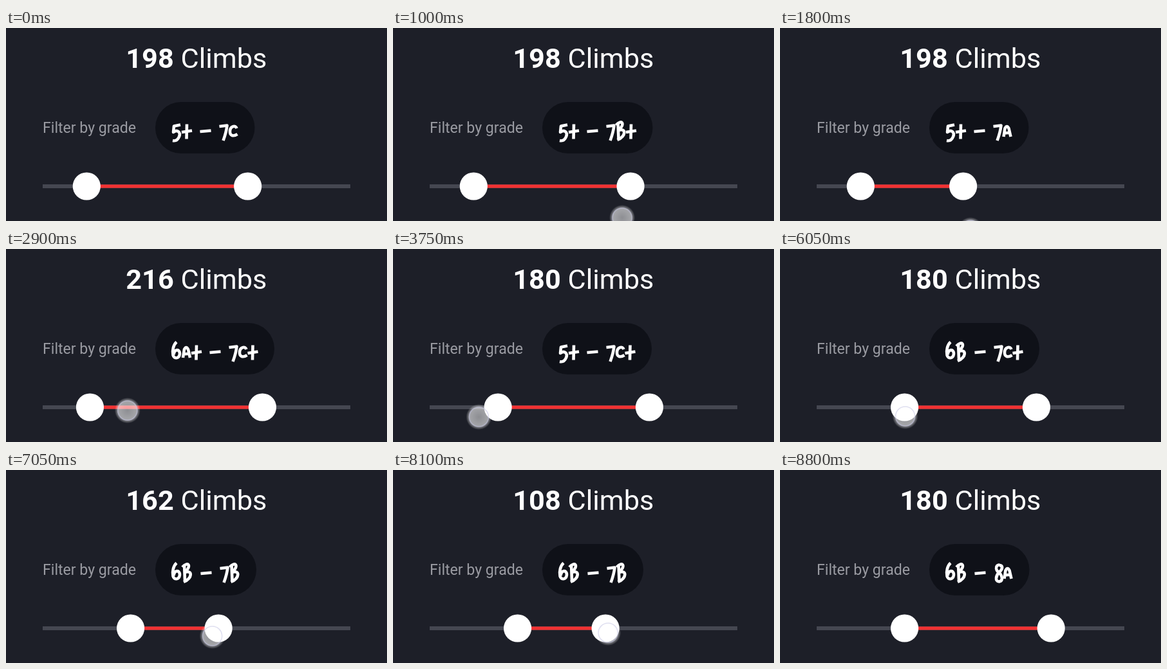
Recreate the animation shown at these times as an HTML page. Size 592 by 300 pixels, loop 8.85 s.

```html
<!DOCTYPE html>
<html lang="en">
<head>
<meta charset="utf-8">
<title>Grade filter</title>
<style>
html, body { margin: 0; width: 100%; height: 100%; overflow: hidden; background: #1d1f28; }
svg { display: block; width: 592px; height: 300px; font-family: Roboto, sans-serif; }
#label path { fill: none; stroke: #fff; stroke-width: 4.6; stroke-linejoin: round; }
</style>
</head>
<body>
<svg viewBox="0 0 592 300">
  <defs>
    <radialGradient id="glow">
      <stop offset="0" stop-color="#fff" stop-opacity=".5"/>
      <stop offset=".7" stop-color="#fff" stop-opacity=".6"/>
      <stop offset="1" stop-color="#fff" stop-opacity="0"/>
    </radialGradient>
  </defs>
  <rect width="592" height="300" fill="#1d1f28"/>
  <text x="295.8" y="61.7" font-size="43.3" fill="#fff" text-anchor="middle"><tspan id="count" font-weight="700">198</tspan> Climbs</text>
  <text x="57" y="163.3" font-size="23.1" fill="#9a9ba2">Filter by grade</text>
  <rect id="pill" x="232" y="115" height="80" rx="40" fill="#0f1118"/>
  <g id="label"></g>
  <rect x="57" y="243" width="478" height="6" fill="#454751"/>
  <rect id="range" y="243.4" height="5.2" fill="#f23132"/>
  <circle id="low" cy="246" r="21.6" fill="#fff"/>
  <circle id="high" cy="246" r="21.6" fill="#fff"/>
  <g id="finger">
    <circle r="20" fill="url(#glow)"/>
    <circle r="15" fill="none" stroke="#cacae6" stroke-opacity=".6" stroke-width="1.5"/>
  </g>
</svg>
<script>
const LOOP = 8850, LAG = 100, LEFT = 57, STEP = 478 / 21;
const FIRST = 3, PER_GRADE = 18;
const $ = id => document.getElementById(id);

// Grades by slider stop, from stop FIRST on
const GRADES = ['5+', '6A', '6A+', '6B', '6B+', '6C', '6C+', '7A', '7A+', '7B', '7B+', '7C', '7C+', '8A'];

// Brush glyphs: advance and strokes
const GLYPHS = {
  '5': [16, 'M14 150.5L4 152.5L3 162C9 157 15 162 12 169C10 174 7 176 2 175'],
  '6': [16, 'M8 144.5C3 149 1 158 2.5 165C4 171 12 171 13 163C13 155 5 155 3.5 164'],
  '7': [14, 'M0 153L12 151.5C11 160 9 167 6 175'],
  '8': [14, 'M12 150C6 143 0 152 6 158C13 163 15 172 8 173.5C1 173 3 164 8 159C14 154 14 148 9 148'],
  'A': [15, 'M2 169L4 156Q7 150 10 156L13 169M3 163.5L12 162.5'],
  'B': [16.5, 'M4 147L5 172M1 151C10 141 16 149 5 159C17 155 17 168 3 174'],
  'C': [15, 'M13 156C11 150 3 153 2.5 160C2 168 8 169 14 165'],
  '+': [15.5, 'M8 149.5L7.5 172.5M0 162L16 159.5'],
  '-': [43, 'M13 161L30 159.5']
};

// Drags of each handle: start, end, stop reached
const moves = {
  low: [[2770, 2895, 5], [3600, 3780, 3], [4600, 4700, 4], [4950, 5100, 5], [5820, 5940, 6]],
  high: [[800, 1350, 10], [1750, 2250, 15], [6700, 6930, 12], [8100, 8350, 16]]
};
const rest = { low: 3, high: 14 };

const touches = [
  { handle: 'high', from: 650, to: 2400, dx: 8, y: 256, dip: 66 },
  { handle: 'low', from: 2650, to: 3200, dx: 18, y: 251 },
  { handle: 'low', from: 3550, to: 3900, dx: 5, y: 261 },
  { handle: 'low', from: 4600, to: 5500, dx: 3, y: 262 },
  { handle: 'low', from: 5550, to: 6350, dx: 1, y: 260 },
  { handle: 'high', from: 6600, to: 7300, dx: -9.5, y: 258 },
  { handle: 'high', from: 8000, to: 8500, dx: 4, y: 253 }
];

// Times at which the climb count catches up with the range
const refreshes = [0, 2650, 3550, 4300, 5750, 6650, 7500, 8800];

const clamp = v => Math.max(0, Math.min(1, v));
const ease = v => { v = clamp(v); return v * v * (3 - 2 * v); };
const stopX = stop => LEFT + STEP * stop;

const value = (handle, t) => moves[handle].reduce(
  (v, [from, to, stop]) => v + (stop - v) * ease((t - from) / (to - from)), rest[handle]);
const nearest = (handle, t) => Math.round(value(handle, t));
const grade = (handle, t) => GRADES[nearest(handle, t) - FIRST];

// The handle trails the finger and lingers at each stop
function handleX(handle, t) {
  const v = value(handle, t - LAG), stop = Math.floor(v);
  return stopX(stop + ease(v - stop));
}

function climbs(t) {
  const at = refreshes.filter(r => r <= t).pop();
  return PER_GRADE * (nearest('high', at) - nearest('low', at));
}

function set(id, attrs) {
  for (const name in attrs) $(id).setAttribute(name, attrs[name]);
}

let shown = '';
function drawLabel(text) {
  if (text === shown) return;
  shown = text;
  let x = 257, html = '';
  for (const ch of text) {
    const [advance, d] = GLYPHS[ch];
    html += `<path transform="translate(${x} 0)" d="${d}"/>`;
    x += advance;
  }
  $('label').innerHTML = html;
  set('pill', { width: x + 26 - 232 });
}

function drawFinger(t) {
  const touch = touches.find(p => t >= p.from && t < p.to);
  if (!touch) return set('finger', { opacity: 0 });
  const { handle, from, to, dx, y, dip = 0 } = touch;
  const x = stopX(value(handle, t)) + dx;
  const sink = dip * Math.sin(Math.PI * (t - from) / (to - from));
  set('finger', {
    opacity: Math.min(clamp((t - from) / 100), clamp((to - t) / 150)),
    transform: `translate(${x} ${y + sink})`
  });
}

function draw(t) {
  const low = handleX('low', t), high = handleX('high', t);
  set('low', { cx: low });
  set('high', { cx: high });
  set('range', { x: low, width: high - low });
  drawLabel(grade('low', t) + '-' + grade('high', t));
  $('count').textContent = climbs(t);
  drawFinger(t);
}

const start = performance.now();
function tick() {
  draw((performance.now() - start) % LOOP);
  requestAnimationFrame(tick);
}
tick();
</script>
</body>
</html>
```
